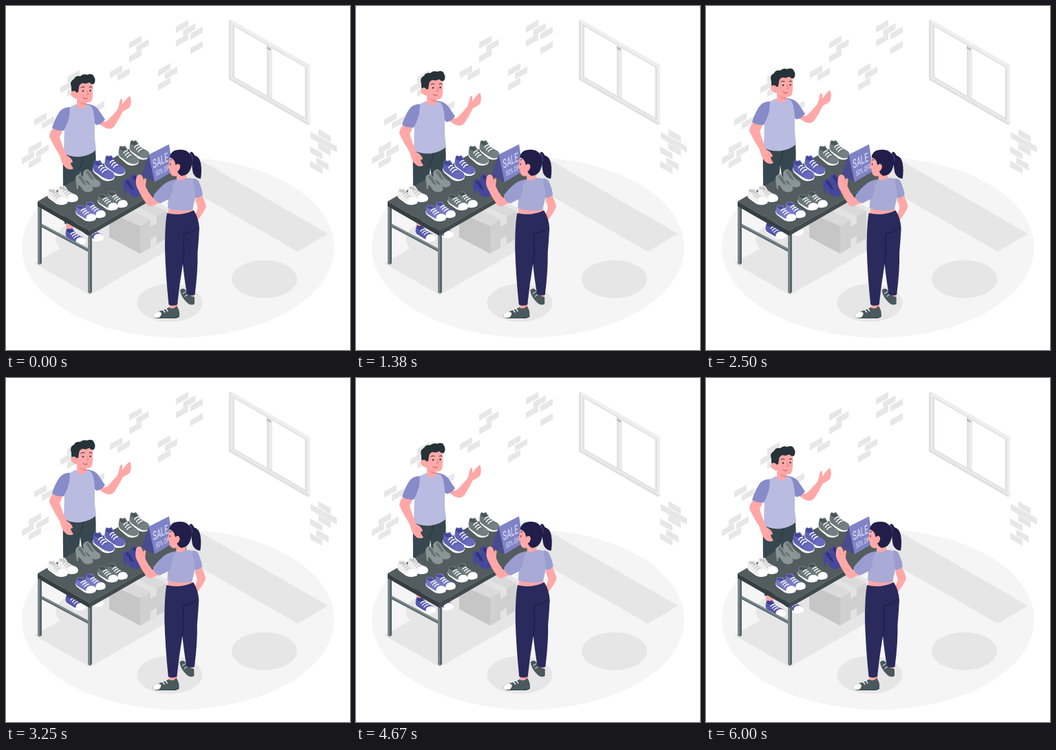
An HTML page that plays this animation: 500x500 px, repeating every 6040 ms.

```html
<!DOCTYPE html>
<html lang="en">
<head>
<meta charset="utf-8">
<title>Shoe stall</title>
<style>
html, body { margin: 0; height: 100%; overflow: hidden; background: #fff; }
svg { display: block; width: 100vw; height: 100vh; }
.line { fill: none; stroke-linecap: round; stroke-linejoin: round; }
.skin { fill: #ffa8a7; }
.white { --c: #f0f0f0; --toe: #fff; --in: #c9c9c9; --lace: #c4c4c4; }
.violet { --c: #7679c2; --toe: #fff; --in: #4c4e9c; --lace: #fff; }
.indigo { --c: #5658ad; --toe: #fff; --in: #3c3d88; --lace: #fff; }
.grey { --c: #6b787b; --toe: #fff; --in: #455255; --lace: #fff; }
.plainViolet { --c: #6063b4; --toe: #686bbb; --in: #45479a; --lace: #fff; }
.plainGrey { --c: #6c787a; --toe: #748082; --in: #4a5659; --lace: #fff; }
.pumpGrey { --c: #8a9596; --in: #667274; }
.pumpViolet { --c: #45479d; --in: #31327a; }
text { font-family: Roboto, "Liberation Sans", sans-serif; fill: #d3d5f0; font-weight: 500; }
</style>
</head>
<body>
<svg viewBox="0 0 500 500">
<defs>
  <g id="sneaker">
    <path fill="#fff" d="M0 9Q0 14 4 16L13 22.500Q20 26 28 22.500Q31 20 29 16Z"/>
    <path style="fill:var(--c)" d="M1 5L2 1Q4-.5 6 1L10 0Q13 3 15 7Q20 11 26 13Q31 16 28 20Q21 23.500 13 19.500L3 13.500Q-.5 11 1 5Z"/>
    <path style="fill:var(--toe)" d="M18.500 14Q24 12 28 14.500Q31 18 28 21Q22 24 15.500 20.500Q15 16 18.500 14Z"/>
    <path style="fill:var(--in)" d="M2 3Q4 0 6 2L9.500 1.500L12 5Q9 7 7 6Q3 6 2 3Z"/>
    <path class="line" style="stroke:var(--lace)" stroke-width="1.300" d="M8 9Q9.500 6 13.500 6M10.500 12Q12 8.500 16 8.500M13 14.500Q15 11 19 11"/>
  </g>
  <g id="pump">
    <path style="fill:var(--c)" d="M1 6Q2 1 8 0Q12 3 15 9Q18 14 25 18Q28 22 25 25Q18 29 12 24Q9 18 5 16L5 22L3 22Z"/>
    <path style="fill:var(--in)" d="M5 5Q6 2 8 2Q11 5 14 11L17 16Q13 16 11 13Q9 9 5 5Z"/>
  </g>
</defs>

<ellipse cx="250" cy="351" rx="227" ry="131" fill="#f5f5f5"/>
<g id="bricks" fill="#e7e7e7"></g>

<g id="window">
  <path fill="#e0e0e0" d="M324 22L327 20L442 86V171L439 173L324 107Z"/>
  <path fill="#efefef" d="M327 20L442 86V171L327 105Z"/>
  <path fill="#e2e2e2" d="M329 26L438 89V167L329 104Z"/>
  <path fill="#fff" d="M332 30L379 57V130L332 103ZM387 62L434.500 89V162L387 134.500Z"/>
  <path fill="#ececec" d="M382 59L387 62V134L382 131Z"/>
  <path fill="#b8b8b8" d="M379 59L385 62V65L379 62Z"/>
</g>

<g id="shade" fill="#e6e6e6">
  <path d="M468 331L424 357L240 251L284 225Z"/>
  <ellipse cx="375.500" cy="397" rx="47.500" ry="27.500"/>
  <ellipse cx="238" cy="431.500" rx="47.500" ry="27.500"/>
  <ellipse cx="120" cy="339" rx="47.500" ry="27.500"/>
  <path d="M41 374L122 420L270 335L270 314L208 278Z"/>
</g>

<g id="box">
  <path fill="#dadada" d="M150 306L195 280L233 298L195 321Z"/>
  <path fill="#c6c6c6" d="M150 300L195 320V360L150 336Z"/>
  <path fill="#d0d0d0" d="M195 320L233 298V338L195 360Z"/>
  <path fill="#e3e3e3" d="M175 293L184 288L219 306V316L210 321V311ZM210 339L219 334V346L210 351Z"/>
</g>

<g id="man">
  <path fill="#37474f" d="M83 213Q108 222 130 207Q132 235 128 270L126 325H119L108 240L99 317Q91 321 85 316Q82 260 83 213Z"/>
  <path class="line" stroke="#263238" d="M112 219Q111 232 105 238"/>
  <path class="skin" d="M87 316L97 317L99 328L88 327ZM120 322H126V331H120Z"/>
  <use href="#sneaker" class="indigo" x="86" y="323"/>
  <use href="#sneaker" class="indigo" x="112" y="318"/>

  <path class="skin" d="M128 163Q141 172 148 166L161 152Q164 147 165 139Q167 133 169 136L169 143Q173 137 178 132Q181 130 181 133Q183 140 180 147Q175 151 170 153Q164 165 158 174Q153 181 144 177L130 168Z"/>
  <path fill="#878bc8" d="M117 142Q128 143 134 150L144 165Q139 172 131 173L122 162Z"/>
  <path fill="#b9bbe0" d="M101 143L93 147Q86 153 85 174L84 214Q93 220 108 219Q123 217 131 209L129 192Q129 178 129 170Q128 150 123 145L117 143Z"/>
  <path fill="#878bc8" d="M93 147Q82 147 77 155Q71 164 67 177Q74 183 84 181Q90 170 92 160Z"/>
  <path class="skin" d="M68 178Q63 184 63 190Q69 203 78 217Q81 231 88 236Q94 239 98 236Q94 231 94 228L97 227Q96 221 88 217Q82 205 78 190Q81 186 82 181Q75 182 68 178Z"/>
  <path class="line" stroke="#f28f8f" stroke-width=".7" d="M87 225Q90 231 95 235M91 223L94 228"/>

  <path class="skin" d="M103 126L103 145Q109 153 117 145L117 139Z"/>
  <path fill="#f28f8f" d="M106 138Q111 142 117 141L117 144Q110 145 106 138Z"/>
  <path class="skin" d="M101 114Q108 105 125 108Q127 119 126 129Q126 139 121 140Q108 142 103 134Z"/>
  <path fill="#263238" d="M102 135Q94 127 95 118Q92 109 99 106Q101 101 108 102Q112 98 118 100Q126 97 128 103Q131 108 128 113Q125 115 121 111Q116 114 111 112Q106 114 106 119L105 125L103 126Z"/>
  <path class="skin" d="M103 126Q99 121 95 125Q92 129 98 133Q102 135 104 133Z"/>
  <g fill="#263238"><circle cx="112" cy="123.500" r="1.200"/><circle cx="122.500" cy="123" r="1.200"/></g>
  <path class="line" stroke="#263238" d="M109 118.500Q111 116.500 114 118M121 118Q123 116.500 125 118"/>
  <path class="line" stroke="#e87878" d="M118 123L120 128L117 128.500"/>
  <path class="line" stroke="#a84d55" d="M112 133Q114 136 118 134"/>
</g>

<g id="table">
  <path fill="#58666b" d="M46 287H52V374L49 376L46 374ZM119 331H125V416L122 418L119 416Z"/>
  <path fill="#7b898e" d="M46 287H49V376L46 374ZM119 331H122V418L119 416Z"/>
  <path fill="#7b898e" d="M52 316.500L119 352V357L52 321.500Z"/>
  <path fill="#58666b" d="M52 319.500L119 355V357L52 321.500Z"/>
  <path fill="#535c5e" d="M46 284L187 203L262 246L121 327Z"/>
  <path fill="#353e41" d="M46 284L121 327V334L46 291Z"/>
  <path fill="#414b4e" d="M121 327L262 246V253L121 334Z"/>
</g>

<g id="goods">
  <g class="plainGrey"><use href="#sneaker" transform="translate(179 195) scale(1 1.180)"/><use href="#sneaker" transform="translate(163 203) scale(1 1.200)"/></g>
  <g class="plainViolet"><use href="#sneaker" transform="translate(143 217) scale(1.020 1.240)"/><use href="#sneaker" transform="translate(126 224) scale(1.070 1.260)"/></g>
  <g class="pumpGrey"><use href="#pump" x="111" y="237"/><use href="#pump" x="100" y="244"/></g>
  <g class="pumpViolet"><use href="#pump" x="179" y="244"/><use href="#pump" x="169" y="251"/></g>
  <g class="white"><use href="#sneaker" x="75" y="261"/><use href="#sneaker" x="60" y="265"/></g>
  <g class="grey"><use href="#sneaker" x="147" y="269"/><use href="#sneaker" x="133" y="273"/></g>
  <g class="violet"><use href="#sneaker" x="115" y="284"/><use href="#sneaker" x="101" y="289"/></g>
</g>

<g id="sign">
  <path fill="#494b91" d="M207.500 216L197 246L216 256Z"/>
  <path fill="#7f83c6" d="M207.500 216L237 201L243 240L216 256Z"/>
  <text transform="matrix(.52 -.26 .1 1 214 236.500)" font-size="18">SALE</text>
  <text transform="matrix(.52 -.27 .1 1 218 248)" font-size="11">50% OFF</text>
</g>

<g id="woman">
  <path class="skin" d="M263 415L273 419L273 426L265 425ZM238 431H250L249 442H237Z"/>
  <path fill="#4a595d" d="M253 413Q258 408 262 414Q266 422 274 423V433Q269 436 264 432Q254 423 253 413Z"/>
  <path class="line" stroke="#fff" d="M257 418L261 415.500M260 422L264 419.500"/>
  <path fill="#37474f" d="M214 451Q216 454 221 454H247L252 452V449H214Z"/>
  <path fill="#4a595d" d="M214 450Q214 446 222 444Q232 441 237 438Q243 442 248 436Q253 442 252 451L242 453H218Q214 453 214 450Z"/>
  <path fill="#fff" d="M214 450Q214 446 222 444L226 446Q226 451 222 453H218Q214 453 214 450Z"/>
  <path class="line" stroke="#fff" stroke-width="1.300" d="M228 441.500L231 445M232 439.500L235 443.500"/>

  <path class="skin" d="M277 277L285 275Q289 284 291 291Q289 298 279 311Q276 315 273 310L278 296Q280 293 275 282Z"/>
  <path class="skin" d="M237 291L271 291L273 302L235 305Z"/>
  <path fill="#2a2a5c" d="M234 301Q254 306 273 297Q280 308 281 323Q280 341 278.500 358Q279 385 274.500 420Q268 422 263 419Q259 395 257 375Q252 405 249 434Q242 437 236.500 434Q232 390 231 352Q231 317 234 301Z"/>
  <path class="line" stroke="#191943" d="M278 322Q271 329 259 331Q257 343 259 357Q258 366 257 374"/>

  <path class="skin" d="M217 277Q214 280 212 277Q206 270 203 262Q203 258 204 252Q202 248 200 253Q198 245 195 245Q190 244 189 252Q188 259 191 265Q197 278 205 289Q209 293 214 290L223 286Z"/>
  <path class="line" stroke="#f28f8f" stroke-width=".7" d="M194 250L196 257M200 253L199 259"/>
  <path fill="#a9abd6" d="M247 252L264 250Q273 249 277 256L275 279L271 296Q252 300 235 294L237 268Z"/>
  <path fill="#9a9dd0" d="M247 252Q238 253 231 258Q223 264 214 276Q216 284 224 287L238 280Q243 270 243 259ZM272 250.500Q279 251 281 257Q285 266 286 274Q282 279 275 279Q275 266 272 258Z"/>

  <path class="skin" d="M248 237H261L262 250Q255 255 248 252Z"/>
  <path class="skin" d="M240 218Q236 223 237 230L235 235L238 237Q238 246 243 247Q249 249 253 242L256 227Z"/>
  <path fill="#211f49" d="M267 214Q270 209 274 217Q281 219 283 228Q285 239 283 251Q275 250 272 243Q270 235 270 224Z"/>
  <path fill="#211f49" d="M238 220Q239 210 250 209Q262 207 268 216Q273 224 269 235Q266 246 255 247Q249 244 249 238L246 229Q245 222 238 220Z"/>
  <path class="skin" d="M246 233Q248 228 252 230Q255 235 250 240Q246 240 246 233Z"/>
  <path class="line" stroke="#211f49" d="M239 224L241 223M239 229V231"/>
  <path class="line" stroke="#3f3d70" stroke-width="1.500" d="M268 214Q272 219 271 225"/>
</g>
</svg>
<script>
const $ = id => document.getElementById(id);

// Top-left corner of each brick; the two walls slope opposite ways
const leftWall = [[247,30],[257.5,35],[268,40],[247,50],[268,61],[179,53],[189.5,58],[179,73],
  [151,96],[162,100],[221,93],[231,98],[221,114],[89,103],[79,118],[89,123],[125,148],
  [41,165],[52,170],[33,206],[44,211],[23,221],[33,227]];
const rightWall = [[454,179],[443,183],[463,194],[453,189],[442,204],[454,199],[451,220],[442,225]];
const brick = rise => ([x, y]) => `<path d="M${x} ${y}l18 ${rise}v9l-18 ${-rise}z"/>`;
$('bricks').innerHTML = leftWall.map(brick(-10)).join('') + rightWall.map(brick(10)).join('');

const LOOP = 6040, CYCLE = 6000;
const sway = [0, -1, 2, -4, 4, -4, 4, -4, 2, -1, 0];

function draw(now) {
  const p = Math.min(now % LOOP / CYCLE, 1);
  const lift = 10 * (1 - Math.abs(2 * p - 1));
  const i = Math.min(Math.floor(p * 10), 9);
  const dx = sway[i] + (sway[i + 1] - sway[i]) * (p * 10 - i);
  $('man').setAttribute('transform', `translate(0 ${-lift})`);
  $('woman').setAttribute('transform', `translate(${dx} 0)`);
  requestAnimationFrame(() => draw(performance.now() - start));
}
const start = performance.now();
draw(0);
</script>
</body>
</html>
```
